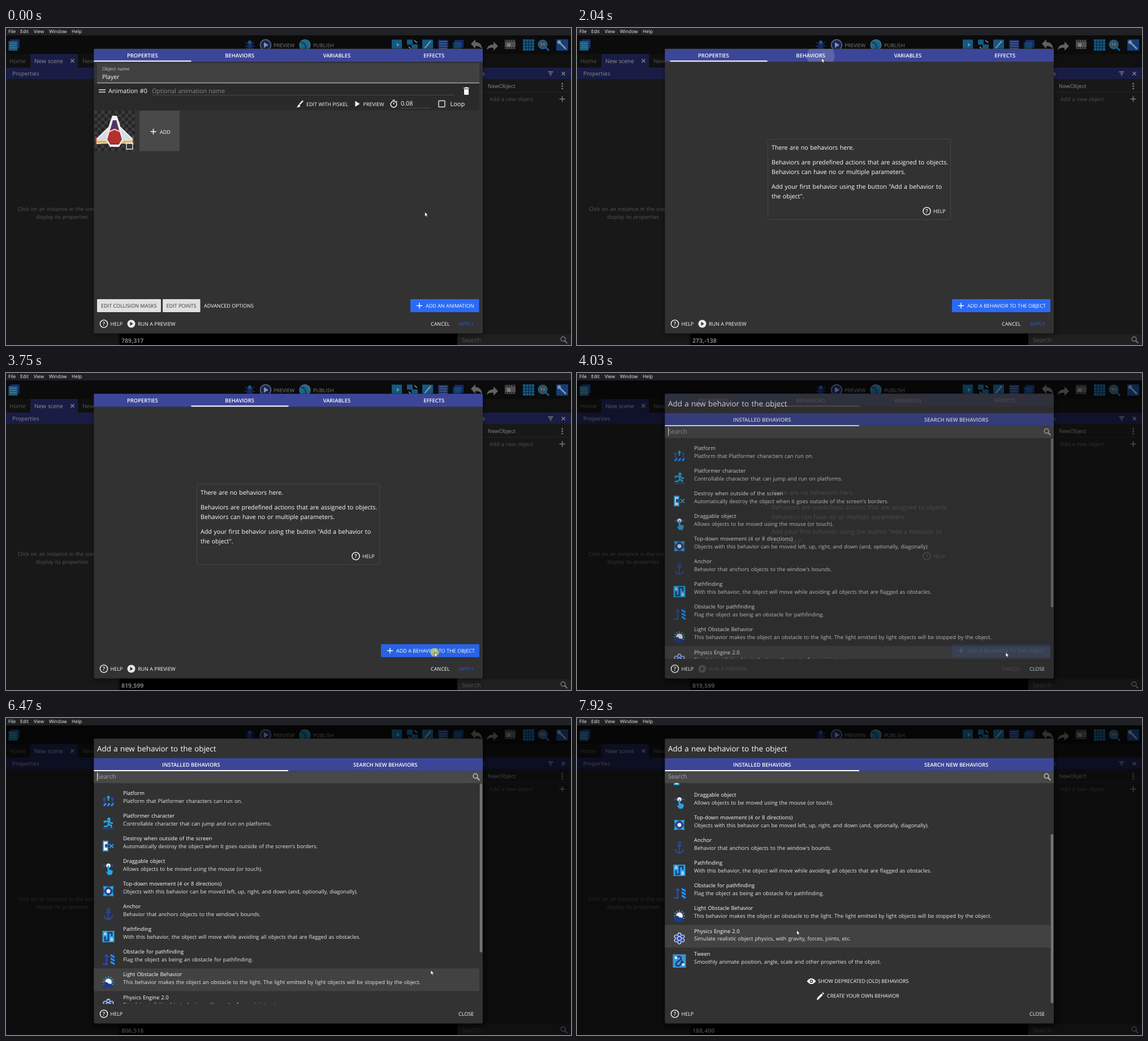
An HTML page that plays this animation: 999x560 px, repeating every 7990 ms.

```html
<!DOCTYPE html>
<html lang="en">
<head>
<meta charset="utf-8">
<title>Add a behavior</title>
<style>
html, body { margin: 0; width: 100%; height: 100%; overflow: hidden; background: #0c0c0d; }
svg { display: block; width: 999px; height: 560px; }
text { font-family: "Open Sans", "Noto Sans", sans-serif; text-rendering: geometricPrecision; white-space: pre; word-spacing: .065em; }
text.caps { word-spacing: 0; }
</style>
</head>
<body>
<svg id="stage" viewBox="0 0 999 560" xmlns="http://www.w3.org/2000/svg"></svg>
<script>
const LOOP = 7990;
const INDIGO = '#3c4698', PAPER = '#303030', BLUE = '#2b6af5', CYAN = '#29a3e0', NAVY = '#2c4aac', PALE = '#e8f2fa';
const BODY = 9.37, CAPS = 9, FIELD = 10.8;

// Shape helpers
const rect = (x, y, w, h, fill, more = '') => `<rect x="${x}" y="${y}" width="${w}" height="${h}" fill="${fill}" ${more}/>`;
const circle = (x, y, r, fill, more = '') => `<circle cx="${x}" cy="${y}" r="${r}" fill="${fill}" ${more}/>`;
const shape = (d, fill, more = '') => `<path d="${d}" fill="${fill}" ${more}/>`;
const line = (d, color, w = 1, more = '') => `<path d="${d}" fill="none" stroke="${color}" stroke-width="${w}" ${more}/>`;
const group = (more, ...parts) => `<g ${more}>${parts.join('')}</g>`;
const at = (x, y, ...parts) => group(`transform="translate(${x} ${y})"`, ...parts);
// y is the middle of the capitals
const text = (x, y, str, size = BODY, fill = '#fff', more = '') =>
  `<text x="${x}" y="${(y + size * 0.36).toFixed(2)}" font-size="${size}" fill="${fill}" ${more}>${str}</text>`;
const MID = 'text-anchor="middle"', BOLD = 'font-weight="600"';
const caps = (x, y, str, fill = '#fff') => text(x, y, str, CAPS, fill, 'class="caps"');

const plus = (x, y, r, color = '#fff', w = 1.4) => line(`M${x - r} ${y}h${2 * r}M${x} ${y - r}v${2 * r}`, color, w);
const cross = (x, y, r, color) => line(`M${x - r} ${y - r}l${2 * r} ${2 * r}m0 ${-2 * r}l${-2 * r} ${2 * r}`, color, 1.3);
const lens = (x, y, color) => circle(x - 1.5, y - 1.5, 3.9, 'none', `stroke="${color}" stroke-width="1.5"`) +
  line(`M${x + 1.5} ${y + 1.5}l4.3 4.3`, color, 1.9);
const help = (x, y) => circle(x, y, 6.6, 'none', 'stroke="#fff" stroke-width="1.4"') +
  text(x, y, '?', 9.6, '#fff', MID + ' ' + BOLD) + caps(x + 11.5, y, 'HELP');
const button = (x, w, label, id = '') => rect(x, 479, w, 23, BLUE, `rx="1" id="${id}"`) +
  plus(x + 16, 490.5, 5) + caps(x + 27, 491, label);

function toolbar() {
  const b = '#145a85', n = '#182a66', g = '#626262';
  return [
    rect(0, 13, 999, 33, '#0b0b0c'),
    rect(8, 20, 16, 16, n), rect(4.5, 23, 16, 17, '#17597c'),
    [27, 31, 35].map(y => line(`M6.5 ${y}h12`, '#5b7f92', 1.3)).join(''),
    at(431, 30, shape('M-4-5h8v11l-4 3-4-3z', n), circle(0, -5, 3, b),
      line('M-8-5l4 3M8-5l-4 3M-9 2h5M9 2h-5M-7 8l3-3M7 8l-3-3', n, 1.8)),
    circle(459, 30, 9.5, '#16275a', 'stroke="#65758a" stroke-width="1.5"'), shape('M456 25l8 5-8 5z', '#8a929c'),
    caps(473, 30.5, 'PREVIEW', '#808080'),
    circle(528.5, 30, 9.5, '#176a8c', 'stroke="#65757f" stroke-width="1.2"'), line('M521 25q10 1 9 13', '#1c3f6a', 3),
    caps(543, 30.5, 'PUBLISH', '#808080'),
    rect(682, 20.5, 18, 17, b), shape('M691 26l5 4-5 3z', '#8aa', 'opacity=".7"'), line('M683 38h17', n, 3),
    rect(709, 20.5, 10, 9, b), rect(717, 29, 11, 9, b), line('M712 33l4 4M722 22l5 4', '#8aa', 1.6),
    rect(736, 20.5, 19, 17, b), line('M740 36l11-13', '#8c9aa0', 2),
    rect(764, 21, 18, 17, n), [24, 28, 32, 36].map(y => line(`M766 ${y}h14`, '#5f7c98', 1.3)).join(''),
    rect(793, 21, 16, 14, n), rect(790, 25, 15, 13, b, 'opacity=".55"'),
    shape('M822 28l8-8v5q11 0 12 13-4-7-12-6v5z', g),
    shape('M870 32l-8-8v5q-11 0-12 10 4-5 12-4v5z', g),
    rect(882, 21, 19, 16, '#4f4f4f'), line('M883 23h18M883 35h18', '#111', 2, 'stroke-dasharray="2 2"'), rect(886, 27, 6, 6, '#7d7d7d'),
    rect(914, 20, 20, 20, b), line('M919 20v20M924 20v20M929 20v20M914 25h20M914 30h20M914 35h20', '#0a1d33', 1.1),
    circle(949, 29, 7.5, '#3e4a55', 'stroke="#17618c" stroke-width="2.2"'), text(949, 29, '1:1', 6, '#b5b5b5', MID + ' ' + BOLD),
    line('M955 35l5 5', '#17618c', 3),
    rect(973, 20, 21, 20, '#153d78'), line('M978 25l12 12', '#7f93a5', 3), circle(978, 25, 3.2, '#7f93a5'),
  ].join('');
}

function page() {
  const navy = '#191d45', dim = '#555', soft = '#8a8a8a';
  return [
    rect(0, 0, 999, 560, '#181818'), toolbar(),
    rect(0, 46, 999, 24, '#101010'), rect(43, 46, 84, 24, navy),
    text(6, 58.5, 'Home', 10.1, dim), text(50, 58.5, 'New scene', 10, '#929292'),
    cross(117.5, 58, 3, '#8a8a8a'), text(135, 58.5, 'New scene (Events)', 10, dim),
    rect(0, 70, 198, 20, navy), text(11, 80.5, 'Properties', 9.9, soft),
    text(99, 320, 'Click on an instance in the scene to', BODY, dim, MID),
    text(99, 334, 'display its properties', BODY, dim, MID),
    rect(198, 70, 600, 490, '#000'), rect(198, 70, 3, 490, '#111'),
    rect(798, 70, 201, 20, navy), text(847, 80.5, 'Objects', 9.9, soft, 'text-anchor="end"'),
    line('M958.5 77.5h9M960.5 80.5h5M962 83.5h2', soft, 1.3), cross(985.5, 80.5, 3, soft),
    text(852, 103, 'NewObject', 9.5, soft), [98.5, 102.7, 107].map(y => circle(983.5, y, 1.3, '#8c8c8c')).join(''),
    line('M798 113.5h201', '#242424'), text(855, 125.5, 'Add a new object', BODY, '#505050'), plus(983.5, 125.5, 5, '#808080'),
    rect(798, 541, 201, 19, '#202020'), text(806, 551, 'Search', 10.7, dim), lens(986.5, 551, '#7c7c7c'),
    text(204, 552.5, '', 10.6, '#808080', 'id="coords" font-weight="700"'),
  ].join('');
}

function menu() {
  const items = { File: 4, Edit: 25, View: 49, Window: 76, Help: 116 };
  return rect(0, 0, 999, 13, '#202124') +
    Object.keys(items).map(k => text(items[k], 6, k, 8.4, '#f2f2f2')).join('');
}

function ship() {
  const wing = shape('M185 171L160 195v10l22-1z', '#d5dbe0') + rect(159, 199.5, 21, 3, '#e6b422') +
    rect(157.8, 191, 2.2, 15, '#b5302f') + line('M184 174l-23 22', '#f6f6f6', 1.5);
  return wing + group('transform="translate(384 0) scale(-1 1)"', wing) +
    shape('M188 155h8l5 14 6 30-7 11h-16l-7-11 6-30z', '#eef0f2') +
    shape('M189 163l-10 34 5 8h16l5-8-10-34z', '#b3302f') +
    shape('M189 163h6l4 17-7-3-7 3z', '#4a3866') +
    line('M183 183l9-4 9 4', '#eef0f2', 1.6) + line('M184 205h16', '#7d2222', 1.5);
}

function propsPane() {
  return [
    rect(161, 62, 676, 35, '#414141'), line('M161 97h676', '#d8d8d8', 1.2),
    text(170, 72.5, 'Object name', 8, '#c9c9c9'), text(170, 86.5, 'Player', 10.6),
    rect(156, 98, 681, 47.5, '#2a2a2a'), line('M164 109.3h12M164 113.2h12', '#e8e8e8', 1.5),
    text(181, 111.5, 'Animation #0', 10.85), text(258, 111, 'Optional animation name', 10.7, '#8a8a8a'), line('M258 118.5h534', '#4a4a4a'),
    shape('M810 108h8v8.5q0 1.5-1.5 1.5h-5q-1.5 0-1.5-1.5zM809 105.5h2.5l1-1h3l1 1h2.5v1.5h-10z', '#fff'),
    line('M525 128.5l-6 6.5', '#fff', 2.4), shape('M513 140q3 0 3-3 1-2.5 3-1.5 2 1.5 1 3-2 2.5-7 1.5z', '#fff'),
    caps(531, 134.5, 'EDIT WITH PISKEL'), shape('M617.5 129l8 5-8 5z', '#fff'), caps(631.5, 134.5, 'PREVIEW'),
    circle(685.5, 134.8, 5.4, 'none', 'stroke="#fff" stroke-width="1.4"'), line('M683.5 127.5h4M685.5 131.5v3.5M690 129l1.5 1.5', '#fff', 1.3),
    text(698, 133.5, '0.08', FIELD), line('M698 141.5h53', '#4a4a4a'),
    rect(765, 128.5, 11, 11, 'none', 'rx="1" stroke="#e8e8e8" stroke-width="1.4"'), text(785.5, 134.5, 'Loop', 11),
    rect(156, 146, 72, 71.5, 'url(#check)'), ship(),
    rect(213, 203, 11, 11, 'none', 'rx="1" stroke="#f2f2f2" stroke-width="1.4"'),
    rect(236, 146, 71, 71.5, '#494949'), plus(260.5, 183, 5), caps(272, 183.5, 'ADD'),
    rect(161, 479, 113, 23, '#e0e0e0', 'rx="1"'), caps(168, 491, 'EDIT COLLISION MASKS', '#333'),
    rect(277, 479, 66.5, 23, '#e0e0e0', 'rx="1"'), caps(283.5, 491, 'EDIT POINTS', '#333'),
    caps(350, 491, 'ADVANCED OPTIONS'), button(715, 121.5, 'ADD AN ANIMATION'),
  ].join('');
}

function emptyPane() {
  const lines = [[211, 'There are no behaviors here.'],
    [237, 'Behaviors are predefined actions that are assigned to objects.'],
    [254, 'Behaviors can have no or multiple parameters.'],
    [280, 'Add your first behavior using the button "Add a behavior to'], [297, 'the object".']];
  return rect(337.5, 196.5, 323, 142, 'none', 'rx="3" stroke="#464646"') +
    lines.map(([y, s]) => text(344, y, s, 10.7)).join('') + help(618.5, 323.5) +
    button(663, 174, 'ADD A BEHAVIOR TO THE OBJECT', 'addBtn');
}

const sheet = () => rect(155.5, 36.5, 687.5, 503, PAPER, 'rx="2" filter="url(#shade)"');
const tabs = (y, names) => {
  const w = 687 / names.length;
  return rect(155.5, y, 687.5, 22.5, INDIGO) +
    names.map((s, i) => text(155.5 + w * (i + 0.5), y + 12, s, 9.4, '#fff', `class="caps" ${MID} ${BOLD}`)).join('');
};

function objectDialog() {
  return sheet() + tabs(37, ['PROPERTIES', 'BEHAVIORS', 'VARIABLES', 'EFFECTS']) +
    group('id="ripple" clip-path="url(#tabClip)"', circle(431, 50, 0, '#fff')) +
    group('id="propsPane"', propsPane()) + group('id="emptyPane"', emptyPane()) +
    rect(155.5, 57.5, 172, 2, '#fff', 'id="bar"') + help(173, 522.5) +
    circle(221.5, 522.5, 7, '#e8e8e8') + shape('M219.5 519l5 3.5-5 3.5z', PAPER) +
    caps(233, 523, 'RUN A PREVIEW') + caps(751, 523, 'CANCEL') + caps(801, 523, 'APPLY', '#2a5ae0');
}

// Behavior rows: name, description, icon drawn around 0,0
const arrow = 'M0-4l3.5 4.5h-2.3v5h-2.4v-5h-2.3z';
const rays = (n, f) => Array.from({ length: n }, (_, i) => `<g transform="rotate(${i * 360 / n})">${f}</g>`).join('');
const stripes = (x, y, w, h) => rect(x, y, w, h, '#1c3a8c') + shape([0, 1, 2].map(i => h > w
  ? `M${x} ${y + 1 + i * 6}l${w} 4v3l${-w}-4z`
  : `M${x + 1 + i * 6.5} ${y + h}l3 ${-h}h3l-3 ${h}z`).join(''), CYAN);
const ROWS = [
  ['Platform', 'Platform that Platformer characters can run on.',
    [-7, 0, 7].map((x, i) => at(x, i == 1 ? -5 : -2, shape(arrow, i == 1 ? CYAN : NAVY))).join('') + stripes(-10, 5, 20, 5)],
  ['Platformer character', 'Controllable character that can jump and run on platforms.',
    circle(1, -7, 2.8, CYAN) + line('M-7 0v-3h9l2 3h4M0-3v6l5 1v4M0 3l-3 3h-5', CYAN, 2.6) + rect(-10, 9, 20, 1.6, NAVY)],
  ['Destroy when outside of the screen', 'Automatically destroy the object when it goes outside of the screen\'s borders.',
    rect(-10, -9, 10, 19, CYAN) + rect(-8, -7, 6, 15, PALE) + rect(-6, -3, 5, 6, NAVY) +
    line('M2-3l7 7m0-7l-7 7', CYAN, 1.8)],
  ['Draggable object', 'Allows objects to be moved using the mouse (or touch).',
    line('M-9-5h18', NAVY, 3) + circle(0, -5, 3.8, PALE) +
    shape('M-1.5-5h3v7l6 1.5v4l-2 4h-6l-4-6 3 1z', CYAN)],
  ['Top-down movement (4 or 8 directions)', 'Objects with this behavior can be moved left, up, right, and down (and, optionally, diagonally).',
    rays(4, shape('M-4-5.5h8l-4-5z', NAVY)) +
    group('transform="rotate(45)"', rays(4, shape('M0-13l5 6.5h-10z', CYAN))) + circle(0, 0, 5, NAVY) + circle(0, 0, 3.4, PALE)],
  ['Anchor', 'Behavior that anchors objects to the window\'s bounds.',
    circle(0, -8, 2.2, 'none', `stroke="${NAVY}" stroke-width="1.6"`) + line('M0-6v15M-4-3h8M-7.5 3q1 6 7.5 6.5 6.5-.5 7.5-6.5', NAVY, 1.9)],
  ['Pathfinding', 'With this behavior, the object will move while avoiding all objects that are flagged as obstacles.',
    rect(-10.5, -10, 21, 20, CYAN) + line('M-6 0v7h6v-14h6v6', '#173c88', 2.6) +
    text(-5.5, -5, 'A', 8, '#fff', MID + ' ' + BOLD) + text(6, 5, 'B', 8, '#fff', MID + ' ' + BOLD)],
  ['Obstacle for pathfinding', 'Flag the object as being an obstacle for pathfinding.',
    line('M-10 8.5h7v-12', NAVY, 2.6) + shape('M-3-10l4.5 6h-9z', NAVY) + stripes(4, -10, 7, 20)],
  ['Light Obstacle Behavior', 'This behavior makes the object an obstacle to the light. The light emitted by light objects will be stopped by the object.',
    rays(12, line('M0-10v3', CYAN, 1.6)) + circle(0, 0, 6, PALE) + shape('M-10 10l3-9q4-3 7 2 6-1 9 7z', '#1c3a8c')],
  ['Physics Engine 2.0', 'Simulate realistic object physics, with gravity, forces, joints, etc.',
    rays(6, circle(0, -7, 3.3, PALE)) + rays(6, circle(0, -7, 2.2, NAVY)) +
    circle(0, 0, 5.8, NAVY) + circle(0, 0, 3.6, 'none', `stroke="${PALE}" stroke-width="1.5"`)],
  ['Tween', 'Smoothly animate position, angle, scale and other properties of the object.',
    rect(-11.5, -12, 23, 23.5, '#3a95d6') + line('M-6-6Q4-12 3-3 Q-8 3-6 7 Q0 11 3 4 Q5-5 7 6', '#173070', 2.2) +
    circle(-6, -6, 2.3, '#fff') + circle(7, 6, 2.3, '#fff')],
];
const ROW_H = 40.1, ROW_TOP = 121.5;

function behaviorDialog() {
  const rows = ROWS.map(([name, info, icon], i) => {
    const y = ROW_TOP + i * ROW_H;
    return at(181, y + 24, icon) + text(207, y + 10.8, name) + text(207, y + 24.7, info, BODY, '#e6e6e6');
  }).join('');
  const eye = shape('M406.5 582q8-10 16 0-8 10-16 0z', '#fff') + circle(414.5, 582, 2.9, PAPER) + circle(414.5, 582, 1.5, '#fff');
  const pencil = line('M426 612.5l7.5-7.5', '#fff', 3.4) + shape('M424 615l.8-3.8 3 3z', '#fff') + line('M434.5 604l1.3-1.3', '#fff', 3.4);
  return sheet() + text(161, 54.5, 'Add a new behavior to the object', 13.37) +
    tabs(71, ['INSTALLED BEHAVIORS', 'SEARCH NEW BEHAVIORS']) +
    rect(155.5, 93.5, 687.5, 21.5, '#484848') + rect(155.5, 92, 343.5, 2, '#fff') +
    text(161, 103.5, 'Search', 10.7, '#a9a9a9') + lens(831.5, 104, '#c4c4c4') + rect(161, 96, 1, 15, '#eee', 'id="caret"') +
    group('clip-path="url(#listClip)"', group('id="list"', rect(155.5, 0, 681.5, ROW_H, '#424242', 'id="hover"'), rows,
      eye, caps(426, 582, 'SHOW DEPRECATED (OLD) BEHAVIORS'), pencil, caps(442, 608, 'CREATE YOUR OWN BEHAVIOR'))) +
    rect(837.7, 115.5, 4.6, 298.5, '#747474', 'rx="2" id="thumb"') + help(173, 522.5) + caps(800, 523, 'CLOSE');
}

const $ = id => document.getElementById(id);
$('stage').innerHTML = `<defs>
  <pattern id="check" x="156" y="146" width="12" height="12" patternUnits="userSpaceOnUse">
    ${rect(0, 0, 12, 12, '#262626')}${rect(0, 0, 6, 6, '#3b3b3b')}${rect(6, 6, 6, 6, '#3b3b3b')}</pattern>
  <clipPath id="tabClip">${rect(327.5, 37, 172, 22.5, '#000')}</clipPath>
  <clipPath id="listClip">${rect(155, 115, 688, 390, '#000')}</clipPath>
  <filter id="shade" x="-5%" y="-5%" width="110%" height="112%"><feDropShadow dx="0" dy="4" stdDeviation="6" flood-opacity=".4"/></filter>
  </defs>` + page() + objectDialog() +
  rect(0, 13, 999, 547, '#000', 'id="veil"') + group('id="picker"', behaviorDialog()) + menu() +
  group('id="pointer"', circle(0, 0, 7.7, '#d3dc55', 'id="press" opacity=".7"'),
    shape('M0 0v8l1.9-1.7 1.2 2.8 1.5-.7-1.2-2.7h2.5z', '#fff', 'stroke="#111" stroke-width=".6"'));

// Pointer path: time, x, y, scene x, scene y
const PATH = [
  [0, 740.5, 325, 789, 317], [610, 740.5, 325, 789, 317], [1290, 432.5, 53, 273, -138],
  [2540, 432.5, 53, 273, -138], [3140, 758, 493.5, 819, 599], [5860, 758, 493.5, 819, 599],
  [6460, 751, 445.5, 806, 518], [6760, 751, 445.5, 806, 518], [7430, 377, 382, 176, 408],
  [7900, 388.5, 375, 188, 400], [LOOP, 388.5, 375, 188, 400],
];
const PRESSES = [[390, 460], [1770, 1900], [3750, 3890]];
const ramp = (t, a, b) => Math.min(1, Math.max(0, (t - a) / (b - a)));
const smooth = u => u * u * (3 - 2 * u);

// cubic-bezier(.4, 0, .2, 1)
function standard(x) {
  let lo = 0, hi = 1;
  for (let i = 0; i < 20; i++) {
    const s = (lo + hi) / 2, r = 1 - s;
    if (1.2 * r * r * s + 0.6 * r * s * s + s ** 3 < x) lo = s; else hi = s;
  }
  return smooth(lo);
}

function pointerAt(t) {
  const i = Math.max(1, PATH.findIndex(k => k[0] > t));
  const a = PATH[i - 1], b = PATH[i], u = smooth(ramp(t, a[0], b[0]));
  return a.map((v, j) => v + (b[j] - v) * u).slice(1);
}

const set = (id, name, value) => $(id).setAttribute(name, value);
const show = (id, on) => { $(id).style.display = on ? '' : 'none'; };

function draw(t) {
  const [x, y, sx, sy] = pointerAt(t);
  set('pointer', 'transform', `translate(${x} ${y})`);
  $('coords').textContent = Math.round(sx) + ',' + Math.round(sy);
  show('press', PRESSES.some(([a, b]) => t >= a && t < b));

  const second = t >= 2040;
  show('propsPane', !second);
  show('emptyPane', second);
  show('ripple', second && t < 2310);
  set('ripple', 'opacity', 0.16 * (1 - ramp(t, 2040, 2310)));
  $('ripple').firstChild.setAttribute('r', Math.max(0, (t - 1980) * 0.4));
  set('bar', 'x', 155.5 + 172 * standard(ramp(t, 2000, 2300)));
  set('addBtn', 'fill', x > 663 && x < 837 && y > 479 && y < 502 ? '#2962e3' : BLUE);

  const open = standard(ramp(t, 3885, 4185));
  set('veil', 'opacity', 0.5 * open);
  set('picker', 'opacity', open);
  show('picker', open > 0);
  show('caret', Math.floor((t - 3990) / 530) % 2 === 0);

  const scroll = 117 * (1 - (1 - ramp(t, 6640, 6762)) ** 2);
  set('list', 'transform', `translate(0 ${-scroll})`);
  set('thumb', 'y', 115.5 + scroll * 0.767);
  // The highlighted row only follows once scrolling has settled
  const row = Math.floor((y - ROW_TOP + (t < 6800 ? 0 : scroll)) / ROW_H);
  set('hover', 'y', ROW_TOP + row * ROW_H);
  show('hover', row >= 0 && row < ROWS.length);
}

const start = performance.now();
function tick() {
  draw((performance.now() - start) % LOOP);
  requestAnimationFrame(tick);
}
tick();
</script>
</body>
</html>
```
